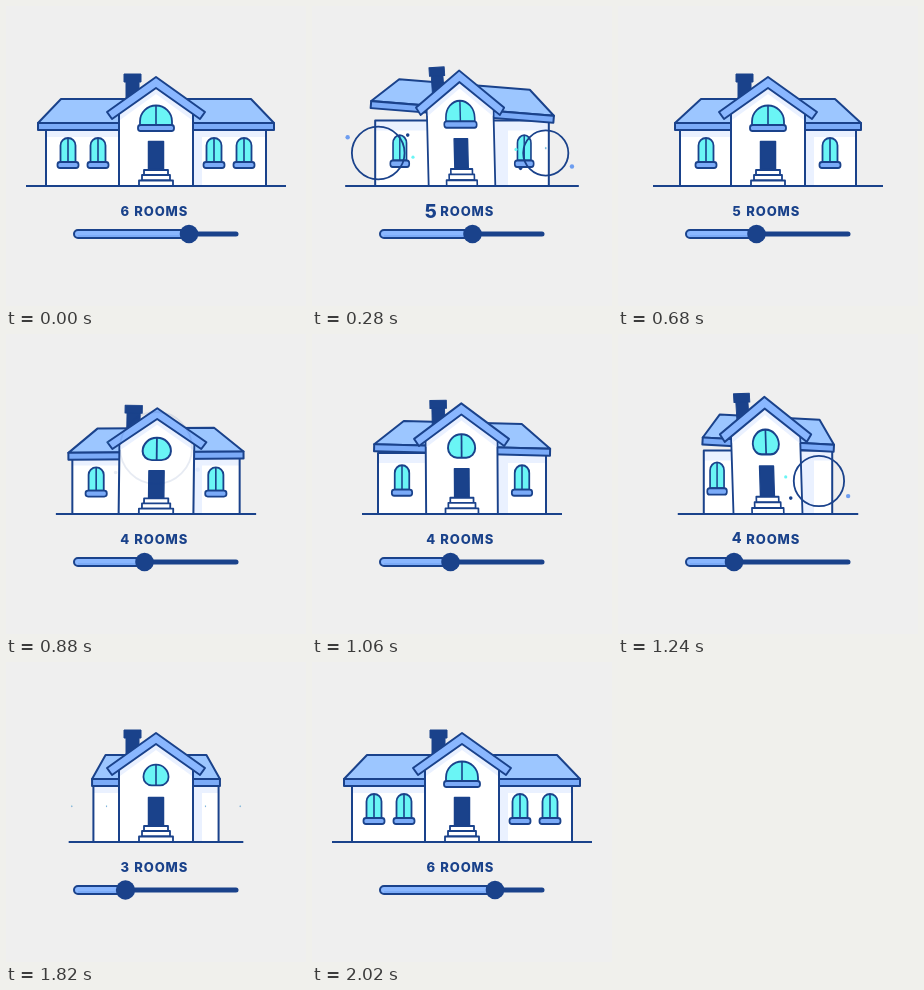
Animation, 300 px wide and 300 px high, one loop 2.4 s. Source, as an HTML page with a canvas:

```html
<!DOCTYPE html>
<html>
<head>
<meta charset="utf-8">
<style>
html, body { margin: 0; height: 100%; overflow: hidden; background: #efefef; }
canvas { display: block; width: 100vw; height: 100vh; }
</style>
</head>
<body>
<canvas id="stage"></canvas>
<script>
const canvas = document.getElementById('stage'), c = canvas.getContext('2d');
const NAVY = '#1a428b', BLUE = '#8ab7ff', SLATE = '#9cc6ff', EAVE = '#7babf8';
const CYAN = '#6af5f5', SHADE = '#eaf1ff', WHITE = '#fff';
const LOOP = 2400, STARTS = [20, 560, 1100], DELAYS = [140, 130, 70], BACK = 1790;

// One value per house size: 6, 5, 4 and 3 rooms
const GROUND = [130, 115, 100, 85], ROOF = [118, 93, 88, 61], WALL = [110, 88, 84, 60];
const SLOPE = [23, 26, 29, 13], INNER = [58, 62, 60, 49], OUTER = [88, 84, 84, 84];
const KNOB = [183, 160.5, 138.5, 116];

const clamp = x => Math.max(0, Math.min(1, x));
const outCubic = x => 1 - (1 - clamp(x)) ** 3;
const outBack = x => { const y = clamp(x) - 1; return 1 + 2.7 * y ** 3 + 1.7 * y * y; };
const inOut = x => { x = clamp(x); return x * x * (3 - 2 * x); };
const wave = x => Math.sin(Math.PI * x);

// Damped wobble that has died out after 400 ms
function wobble(x) {
  const y = x - 25;
  return y < 0 ? 0 : .105 * wave(y / 140) * Math.exp(-y / 250) * clamp((400 - x) / 50);
}

function paint(fill, line = 2) {
  if (fill) { c.fillStyle = fill; c.fill(); }
  if (line) { c.lineWidth = line; c.strokeStyle = NAVY; c.stroke(); }
}
function poly(points, fill, line) {
  c.beginPath();
  points.forEach(p => c.lineTo(...p));
  c.closePath();
  paint(fill, line);
}
function box(x, y, w, h, fill, line, r = 0) {
  c.beginPath();
  c.roundRect(x, y, w, h, r);
  paint(fill, line);
}
function segment(x1, y1, x2, y2, line) {
  c.beginPath();
  c.moveTo(x1, y1);
  c.lineTo(x2, y2);
  paint(null, line);
}
function disc(x, y, r, fill, line) {
  c.beginPath();
  c.arc(x, y, r, 0, 7);
  paint(fill, line);
}
function group(draw) { c.save(); draw(); c.restore(); }
function scaleAt(x, y, sx, sy) { c.translate(x, y); c.scale(sx, sy); c.translate(-x, -y); }
function rotateAt(x, y, degrees) { c.translate(x, y); c.rotate(degrees * Math.PI / 180); c.translate(-x, -y); }

// Arched window with a mullion and a sill
function arch(x, base, w, h, size) {
  if (size <= .05) return;
  group(() => {
    scaleAt(x, base - h / 2, size, size);
    const r = w / 2, ry = Math.min(r, h - 3);
    c.beginPath();
    c.moveTo(x - r, base);
    c.lineTo(x - r, base - h + ry);
    c.ellipse(x, base - h + ry, r, ry, 0, Math.PI, 2 * Math.PI);
    c.lineTo(x + r, base);
    c.closePath();
    paint(CYAN, 1.8);
    segment(x, base - h, x, base, 1.6);
    const lip = w > 20 ? 2 : 3;
    box(x - r - lip, base, w + 2 * lip, 6, EAVE, 1.8, 2.5);
  });
}

function roundWindow(size) {
  if (size <= .05) return;
  group(() => {
    scaleAt(150, 113, size, size);
    box(136, 101.5, 28, 23, CYAN, 2, [14, 14, 9.5, 9.5]);
    segment(150, 101.5, 150, 124.5, 1.8);
  });
}

function burst(x, y, age, side) {
  if (age <= 0 || age >= 220) return;
  group(() => {
    const r = 36 * outCubic(age / 200), spread = side * r / 25;
    c.globalAlpha = clamp((200 - age) / 90);
    disc(x, y, r, null, 1.8);
    [[-33, -4, 1.6, CYAN], [-28, 17, 1.8, NAVY], [29, 15, 2.2, '#6d9df0']].forEach(([dx, dy, size, color]) =>
      disc(x + dx * spread, y + dy * spread, size, color, 0));
  });
}

function wing(side, s) {
  group(() => {
    c.translate(150, 0);
    c.scale(side, 1);
    const top = 121 - s.lift * .45;
    box(25, top, s.wall - 25, 180 - top, WHITE, 0);
    box(25, top, s.wall - 25, 10, SHADE, 0);
    if (side > 0) box(30, top, 16, 180 - top, SHADE, 0);
    box(25, top, s.wall - 25, 180 - top, null, 2);
  });
}

// Both slopes move as one rigid piece
function roof(s) {
  group(() => {
    c.translate(0, -s.lift);
    rotateAt(150, 124, s.tilt);
    const r = s.roof, ridge = r - s.slope;
    poly([[150 - ridge, 93], [150 + ridge, 93], [150 + r, 117], [150 - r, 117]], SLATE);
    box(150 - r, 117, 2 * r, 7, EAVE, 2);
  });
}

function middle(s) {
  group(() => {
    c.transform(1, 0, -s.lean / 109, 1, s.lean * 180 / 109, 0);
    scaleAt(150, 180, s.sx, s.sy);
    group(() => {
      rotateAt(126, 100, -s.tilt * .6);
      box(120, 69, 13, 36, NAVY, 1);
      box(118, 68, 17, 8, NAVY, 1);
    });
    poly([[113, 180], [113, 104], [150, 78], [187, 104], [187, 180]], WHITE);
    poly([[114, 106], [150, 81], [186, 106], [186, 114], [150, 88], [114, 114]], SHADE, 0);
    poly([[150, 71], [199, 106], [194, 113], [150, 82], [106, 113], [101, 106]], BLUE);
    arch(150, 119, 32, 19.5, s.archSize);
    roundWindow(s.roundSize);
    box(142.5, 135.5, 15, 28, NAVY, 1.5);
    [[12, 164], [14, 169], [17, 174.5]].forEach(([w, y]) => box(150 - w, y, 2 * w, 5.5, WHITE, 1.8));
  });
}

function slider(x, press) {
  c.lineCap = 'round';
  segment(x, 228, 230, 228, 5);
  box(68, 224, x - 68, 8, BLUE, 2, 4);
  box(72, 229, x - 72, 2, EAVE, 0);
  disc(x, 228, 9.3 + 2.2 * press, NAVY, 0);
  c.lineCap = 'butt';
}

function label(digit, size, rise) {
  c.font = '800 13px Inter, "Open Sans", sans-serif';
  c.fillStyle = NAVY;
  c.textAlign = 'left';
  c.letterSpacing = '0.9px';
  c.fillText('ROOMS', 128.2, 210);
  c.letterSpacing = '0px';
  c.textAlign = 'center';
  c.translate(118.7, 205.3 - rise);
  c.scale(size, size);
  c.fillText(digit, 0, 4.7);
}

function render(t) {
  const back = t >= BACK;
  const step = t >= STARTS[2] ? 2 : t >= STARTS[1] ? 1 : 0;
  const from = back ? 3 : step, to = back ? 0 : step + 1;
  const u = t - STARTS[step], x = u - DELAYS[step];
  const home = inOut((t - BACK) / 225);
  const move = back ? home : outCubic(x / 240);
  const spring = back ? home : outBack(x / 280);
  const slide = back ? home : inOut(u / 110);
  const mix = (list, p) => list[from] + (list[to] - list[from]) * p;

  // The roof trails the walls a little
  const stretch = wobble(x), trail = wobble(x - 20);
  const s = {
    sx: 1 - 1.3 * trail, sy: 1 + stretch, lean: -45 * stretch,
    lift: 190 * Math.max(trail, -.006), tilt: 60 * trail,
    roof: mix(ROOF, spring), wall: mix(WALL, spring), slope: mix(SLOPE, spring)
  };

  // Time since each window popped, per step
  const popLeft = u - [190, 0, 150][step], popRight = u - [205, 0, 75][step], popMid = u - 130;
  const gone = age => clamp(1 - age / 60);
  s.archSize = back ? home : step === 0 ? 1 : step === 1 ? gone(popMid) : 0;
  s.roundSize = back ? 1 - home * 2 : step === 0 ? 0 : step === 1 ? (popMid > 40 ? outBack((popMid - 40) / 130) : 0) : 1;

  const ground = mix(GROUND, move);
  const inner = mix(INNER, spring), outer = mix(OUTER, spring);

  c.fillStyle = '#efefef';
  c.fillRect(0, 0, 300, 300);
  c.lineJoin = 'round';

  [-1, 1].forEach(side => {
    const age = side < 0 ? popLeft : popRight;
    wing(side, s);
    const innerSize = back ? home : step === 2 ? gone(age) : 1;
    const outerSize = back ? home : step === 0 ? gone(age) : 0;
    const draw = (d, size) => group(() => {
      scaleAt(150 + side * d, 180, s.sx, s.sy);
      arch(150 + side * d, 156, 15, 24, size);
    });
    draw(inner, innerSize);
    draw(outer, outerSize);
  });
  roof(s);
  middle(s);
  segment(150 - ground, 180, 150 + ground, 180, 2);

  if (!back) {
    if (step === 1) burst(150, 114, popMid, 1);
    else {
      const d = step ? inner : outer;
      burst(150 - d, 147, popLeft, -1);
      burst(150 + d, 147, popRight, 1);
    }
  }

  slider(mix(KNOB, slide), wave(slide));

  const swapped = x >= 80;
  const digit = back ? 6 - Math.round(3 * (1 - home)) : 6 - step - swapped;
  const pop = back ? 0 : swapped ? .5 * wave(clamp((x - 80) / 110)) : .12 * clamp((x - 30) / 50);
  group(() => label(digit, 1 + pop, swapped || back ? 0 : 1.5 * clamp((x - 30) / 50)));
}

function frame(now) {
  const dpr = devicePixelRatio || 1;
  const w = Math.round(innerWidth * dpr), h = Math.round(innerHeight * dpr);
  if (canvas.width !== w || canvas.height !== h) { canvas.width = w; canvas.height = h; }
  c.setTransform(w / 300, 0, 0, h / 300, 0, 0);
  render(now % LOOP);
  requestAnimationFrame(frame);
}
requestAnimationFrame(frame);
</script>
</body>
</html>
```
